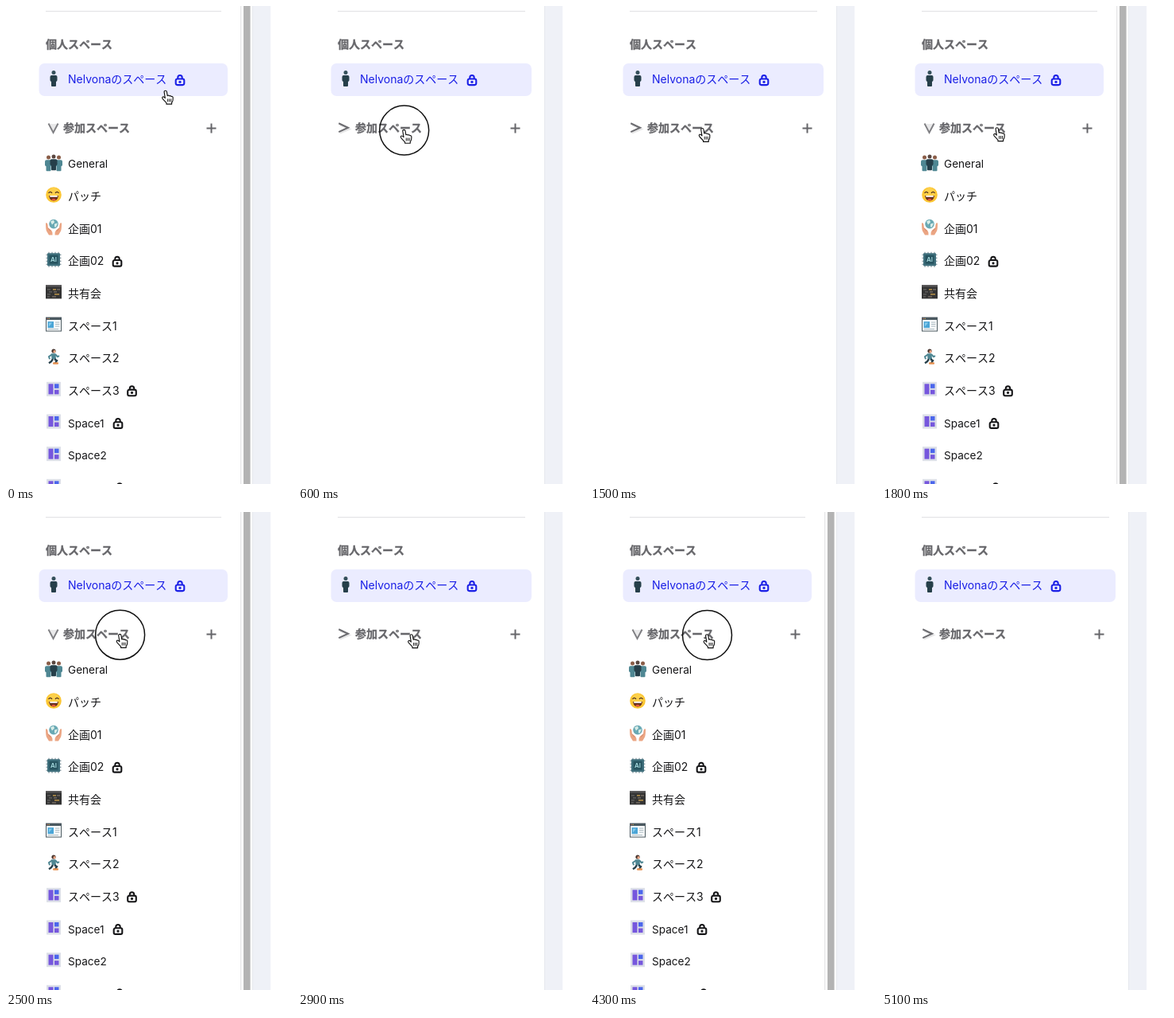
An HTML page with a canvas for the animation above (5400 ms loop, 360 by 600 pixels).

```html
<!DOCTYPE html>
<html lang="ja">
<head>
<meta charset="utf-8">
<title>Sidebar</title>
<style>
html, body { margin: 0; width: 100%; height: 100%; overflow: hidden; background: #fff; }
canvas { display: block; width: 360px; height: 600px; }
</style>
</head>
<body>
<canvas id="stage"></canvas>
<script>
const LOOP = 5400, STEP = 100;
const FONT = 'Inter, "Noto Sans CJK JP", "Noto Sans CJK", sans-serif';
const BLUE = '#1a1fe6', GRAY = '#66666a', INK = '#161618', DARK = '#263f4a', TEAL = '#4f8793', SKIN = '#eba583';
const CLICKS = [600, 1000, 1400, 1700, 2100, 2500, 2800, 3300, 3800, 4300, 4700];
const CURSOR_END = 5000;
// time, fingertip x, fingertip y
const PATH = [[0, 201, 107], [100, 198, 109], [500, 134, 156], [900, 132, 156.5], [1800, 145, 153.5],
  [2900, 143, 154.5], [3500, 150, 157.5], [4300, 147.5, 154.5], [5000, 147, 154.5]];

const canvas = document.getElementById('stage');
const c = canvas.getContext('2d');
const ratio = window.devicePixelRatio || 1;
canvas.width = 360 * ratio;
canvas.height = 600 * ratio;

function rect(x, y, w, h, color, r = 0) {
  c.fillStyle = color;
  c.beginPath();
  c.roundRect(x, y, w, h, r);
  c.fill();
}
function dot(x, y, r, color) {
  c.fillStyle = color;
  c.beginPath();
  c.arc(x, y, r, 0, Math.PI * 2);
  c.fill();
}
function stroke(d, color, width = 2) {
  c.strokeStyle = color;
  c.lineWidth = width;
  c.stroke(new Path2D(d));
}
function fill(d, color) {
  c.fillStyle = color;
  c.fill(new Path2D(d));
}
function at(x, y, draw) {
  c.save();
  c.translate(x, y);
  draw();
  c.restore();
}
function text(str, x, y, color, size = 14, weight = 400) {
  c.font = `${weight} ${size}px ${FONT}`;
  c.fillStyle = color;
  c.fillText(str, x, y);
}
function heading(str, x, y) {
  text(str, x, y, GRAY, 14, 700);
  c.strokeStyle = GRAY;
  c.lineWidth = 0.3;
  c.strokeText(str, x, y);
}
function lock(x, y, color) {
  at(x, y, () => {
    stroke('M-2.7 -2 V-3.7 A2.7 2.7 0 0 1 2.7 -3.7 V-2', color, 2);
    c.strokeStyle = color;
    c.lineWidth = 2.1;
    c.beginPath();
    c.roundRect(-5.3, -2, 10.6, 7.6, 2);
    c.stroke();
    dot(0, 1.8, 1.6, color);
  });
}
function man(x, y, color, head) {
  at(x, y, () => {
    dot(0, -7.4, 2.5, head);
    rect(-4.5, -4, 9, 8, color, 2);
    rect(-3, 0, 6, 10, color, 1);
  });
}

const icons = {
  group() {
    man(-6.5, 1, TEAL, '#8a5d48');
    man(6.5, 1, TEAL, '#8a5d48');
    man(0, 0, DARK, '#5a4740');
  },
  smile() {
    dot(0, 0, 9.8, '#fcc633');
    dot(0, -2, 7, '#fdd04b');
    stroke('M-6.5 -2 Q-4.2 -5 -2 -2 M2 -2 Q4.2 -5 6.5 -2', '#4d3020', 1.3);
    fill('M-6 1 H6 Q5 7.5 0 7.5 Q-5 7.5 -6 1Z', '#66301f');
    rect(-4.8, 1, 9.6, 1.8, '#fff', 0.5);
    fill('M-3 6 Q0 3.5 3 6 Q0 8.5 -3 6Z', '#e8573f');
  },
  globe() {
    dot(0, -4, 5.8, '#69a9b4');
    fill('M-4 -7 L0 -9 L1 -6 L-2 -3Z M1 -4 L5 -5 L3 0 L1 0Z', '#d8ece7');
    for (const side of [-1, 1]) {
      c.save();
      c.scale(side, 1);
      fill('M-10 -5 Q-8 -6 -7.5 -3 L-7 1 L-3 4 Q-1 6 -1.5 10 H-6 L-9 5 Q-10 3 -10 -5Z', SKIN);
      stroke('M-7 1 L-4 5', '#c97d60', 0.8);
      c.restore();
    }
  },
  chip() {
    stroke('M-6 -9.5 V9.5 M-2 -9.5 V9.5 M2 -9.5 V9.5 M6 -9.5 V9.5 M-9.5 -6 H9.5 M-9.5 -2 H9.5 M-9.5 2 H9.5 M-9.5 6 H9.5', '#68808a', 1);
    rect(-8, -8, 16, 16, '#3f6f7c', 1);
    rect(-5.5, -5.5, 11, 11, '#275460');
    c.textAlign = 'center';
    text('AI', 0, 3, '#a8dce0', 8, 600);
    c.textAlign = 'left';
  },
  terminal() {
    rect(-10, -8.5, 20, 17, '#343434');
    rect(-10, -8.5, 20, 2.5, '#504f50');
    stroke('M-8 -3 H-4 M-6 0 H-2 M-8 3 H-4 M-8 6 H-5', '#72716f', 1);
    stroke('M-1 -3 H3 M1 3 H7', '#d6a74d', 1.1);
    stroke('M4 -3 H8 M0 0 H4 M-2 6 H3', '#8f8277', 1);
  },
  browser() {
    rect(-10, -9, 20, 18, '#4b5960');
    rect(-9, -5.5, 18, 13.5, '#fafcfd');
    rect(-7.5, -3.5, 7.5, 8, '#4ba5d6');
    fill('M-6 -2 H-2 L-6 3Z', '#86cbeb');
    stroke('M2 -2.5 H7.5 M2 0 H7.5 M2 2.5 H7.5 M-7 6 H6', '#a8b7bd', 1);
    dot(-8, -7.2, 0.7, '#e8705b');
    dot(-5.8, -7.2, 0.7, '#f0c15a');
  },
  runner() {
    dot(0, -7.2, 2.6, '#49362e');
    dot(1, -6.5, 1.6, SKIN);
    fill('M-3 -4 H2.5 L3 3 H-2.5Z', TEAL);
    stroke('M-2 -3 L-6 0 L-5 3 M2 -3 L5 0 L7 -1', TEAL, 2);
    stroke('M-1 3 L-3 6 L-6 8 M1 3 L4 5 L2 8', DARK, 2.4);
    rect(-1, 7, 7, 2.5, '#e59050', 1);
  },
  tile() {
    rect(-9, -9, 18, 18, '#dcdfe8');
    rect(-6.5, -6.5, 6, 13, '#7657dd');
    rect(1, -6.5, 5.5, 5.5, '#4b66ec');
    rect(1, 1, 5.5, 5.5, '#7657dd');
  }
};

// icon, label, lock x
const ROWS = [
  ['group', 'General'], ['smile', 'パッチ'], ['globe', '企画01'], ['chip', '企画02', 140],
  ['terminal', '共有会'], ['browser', 'スペース1'], ['runner', 'スペース2'],
  ['tile', 'スペース3', 158.5], ['tile', 'Space1', 141], ['tile', 'Space2'], ['tile', 'Space3', 143]
];

function drawRows() {
  ROWS.forEach(([icon, label, lockX], i) => {
    const y = 198.3 + i * 40.65;
    at(60, y - 2, icons[icon]);
    text(label, 78, y + 5, INK, /^[A-Z]/.test(label) ? 13.6 : 14);
    if (lockX) lock(lockX, y + 0.8, INK);
  });
}

function drawFrame(open) {
  rect(0, 0, 360, 600, '#fff');
  rect(310, 0, 23, 600, '#eff1f7');
  rect(310, 0, 1, 600, '#e6e8ee');
  if (open) {
    rect(295, 0, 1, 600, '#e5e5e7');
    rect(296, 0, 13.5, 600, '#fafafa');
    rect(299, 0, 8.5, 600, '#b3b3b3');
  }
  const shift = open ? 0 : 15;
  rect(50, 6, 221 + shift, 1.2, '#e4e4e7');
  heading('個人スペース', 50, 52.5);
  rect(41.5, 72, 237.5 + shift, 41, '#ebecff', 7);
  man(60, 91, DARK, '#35505b');
  text('Nelvonaのスペース', 78, 97.3, BLUE);
  lock(219, 93.5, BLUE);

  if (open) {
    fill('M55 148 L60 159 L67 148Z', '#e9e9ea');
    stroke('M53.5 147.5 L59.5 159 L65.5 147.5', '#7e7e82', 1.9);
  } else {
    stroke('M53 149.5 L65 154.5 L53 159.5', '#e6e6e7', 2);
    stroke('M51.3 147.3 L63 152.7 L51.3 158.1', '#6c6c70', 2.1);
  }
  heading('参加スペース', 72, 158.3);
  at(258.5 + shift, 153.5, () => stroke('M-6 0 H6 M0 -6 V6', GRAY, 2));
  if (open) drawRows();
}

function pointer(t) {
  const i = Math.max(1, PATH.findIndex(p => p[0] >= t));
  const [t0, x0, y0] = PATH[i - 1], [t1, x1, y1] = PATH[i];
  const k = (t - t0) / (t1 - t0), e = k * k * (3 - 2 * k);
  return [x0 + (x1 - x0) * e, y0 + (y1 - y0) * e];
}

function drawCursor(t) {
  const [x, y] = pointer(t);
  at(x, y, () => {
    if (CLICKS.includes(t)) {
      c.strokeStyle = '#111';
      c.lineWidth = 1.5;
      c.beginPath();
      c.arc(0, 0, 31, 0, Math.PI * 2);
      c.stroke();
    }
    const hand = 'M-2 1 Q-2 -0.8 -0.3 -0.8 Q1.3 -0.8 1.5 1 L2.3 6 Q4 4.8 5 6.3 Q6.6 5.4 7.5 7 Q9.5 6.5 9.7 8.5 L9.5 12 Q9 14 8 15 V17 H1 V15.5 L-3.7 10.5 Q-5.5 8 -3.7 7.3 Q-2.5 7 -0.7 9Z';
    c.scale(0.95, 0.95);
    c.lineJoin = 'round';
    fill(hand, '#fff');
    stroke(hand, '#111', 1.2);
    stroke('M2.7 10 V14 M4.8 10 V14 M6.9 10 V14', '#111', 1);
  });
}

function render(now) {
  const t = Math.floor((now % LOOP) / STEP) * STEP;
  c.setTransform(ratio, 0, 0, ratio, 0, 0);
  drawFrame(CLICKS.filter(click => click <= t).length % 2 === 0);
  if (t < CURSOR_END) drawCursor(t);
}

const start = performance.now();
function tick() {
  render(performance.now() - start);
  requestAnimationFrame(tick);
}
tick();
</script>
</body>
</html>
```
